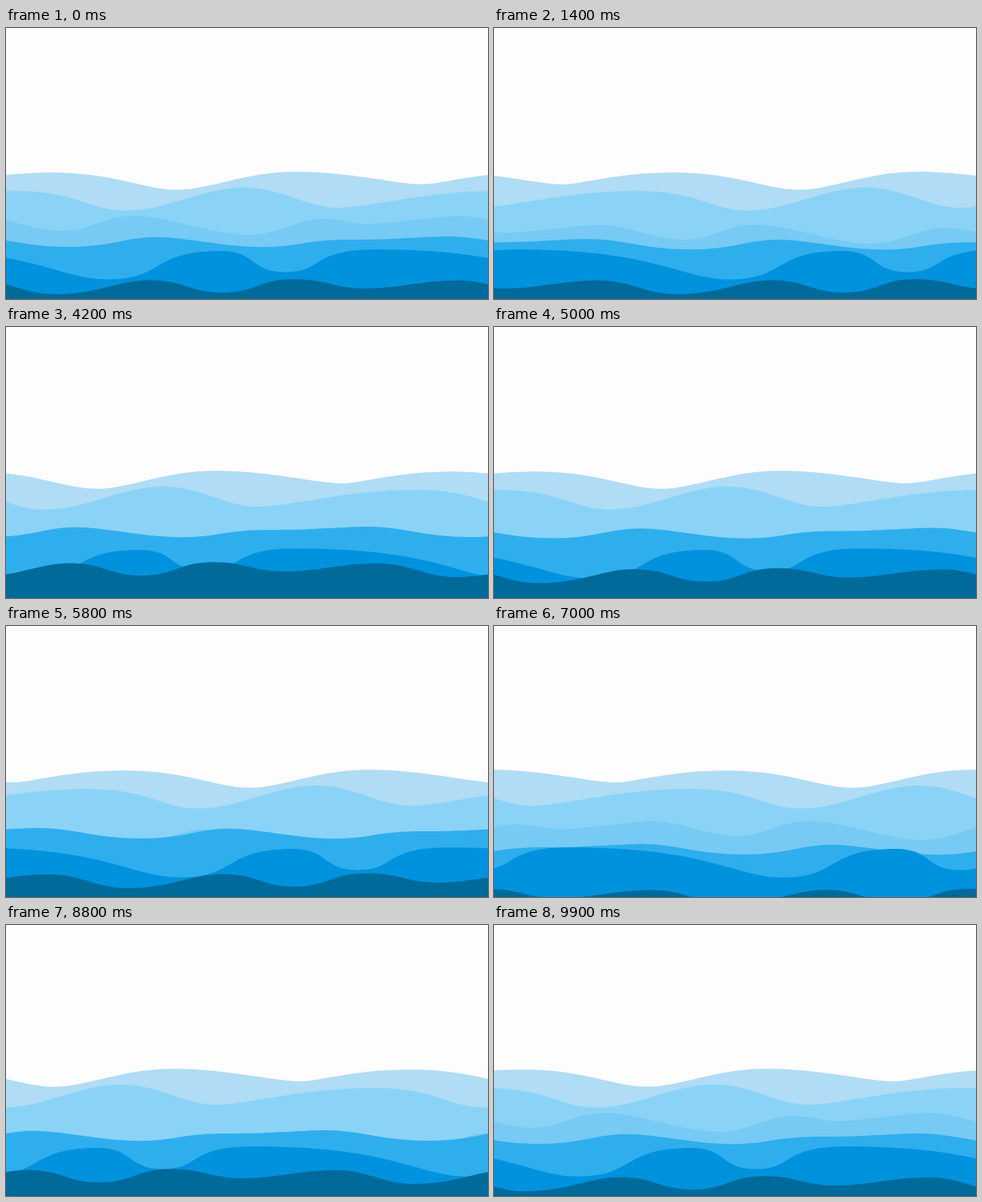
Recreate the animation shown at these times as an HTML page with a canvas. Size 600x338 px, loop 10000 ms.

```html
<!DOCTYPE html>
<html lang="en">
<head>
<meta charset="utf-8">
<title>Waves</title>
<style>
  html, body { margin: 0; width: 100%; height: 100%; overflow: hidden; background: #fefdfe; }
  canvas { display: block; width: 100%; height: 100%; }
</style>
</head>
<body>
<canvas id="sea" width="600" height="338"></canvas>
<script>
const W = 600, H = 338;
const LOOP = 10000, STEP = 100;
const DRIFT = 0.119; // px per ms, shared by all layers
const BOB_TIMES = [0, 2, 2.8, 4.2, 5.8, 7, 8.8, 9.9];
const ctx = document.getElementById('sea').getContext('2d');

// Crests and troughs as [x, y, reach before, reach after]; reach is the
// length of the level Bezier handle, so wide handles make broad crests.
// The wave repeats every W px and the shape spans enough repeats to scroll.
function wave(turns) {
  const path = new Path2D();
  path.moveTo(-2 * W, 2 * H);
  let last = null;
  for (let base = -2 * W; base <= 2 * W; base += W) {
    for (const [x0, y, before, after = before] of turns) {
      const x = base + x0;
      if (last) path.bezierCurveTo(last.x + last.after, last.y, x - before, y, x, y);
      else path.lineTo(x, y);
      last = { x, y, after };
    }
  }
  path.lineTo(last.x, 2 * H);
  path.closePath();
  return path;
}

// Eased rise and fall between the heights at the shared times.
function bobAt(heights, sec) {
  if (!heights) return 0;
  const i = BOB_TIMES.findLastIndex(t => t <= sec);
  if (i === BOB_TIMES.length - 1) return heights[i];
  const u = (sec - BOB_TIMES[i]) / (BOB_TIMES[i + 1] - BOB_TIMES[i]);
  return heights[i] + (heights[i + 1] - heights[i]) * u * u * (3 - 2 * u);
}

const layers = [
  {
    color: '#b0dcf5',
    shape: wave([[58, 180.2, 75], [213, 201.8, 40], [362, 179.2, 65], [517, 195, 28]])
  },
  {
    color: '#8ad3f7',
    shape: wave([[8, 203.3, 85], [150, 227.6, 50], [295, 199, 50], [413, 224.2, 40]])
  },
  {
    color: '#76caf3',
    shape: wave([
      [70, 253, 35], [160, 234.3, 38], [300, 258, 40],
      [393, 238.5, 32], [447, 244.4, 20, 36], [566, 234.5, 30]
    ]),
    bob: [0, 14, 18, 21, 19.5, 9, 25, 0]
  },
  {
    color: '#2faeee',
    shape: wave([
      [78, 273, 55], [187, 260.8, 38], [318, 273.2, 48], [430, 264, 62], [553, 260, 38]
    ]),
    bob: [0, 4, 8, -11, -8, 12, -4, 0]
  },
  {
    color: '#0092dd',
    shape: wave([
      [126, 313.6, 60, 72], [268, 278, 88, 42], [347, 304.4, 42, 50], [462, 276.3, 85, 175]
    ])
  },
  {
    color: '#006a9a',
    shape: wave([
      [60, 332, 38, 55], [180, 314.4, 40], [270, 330, 40],
      [358, 313.3, 42], [447, 325, 40], [562, 314.8, 42]
    ]),
    bob: [0, 0, 13.5, -20, -5, 14.5, -9, 0]
  }
];

function draw(ms) {
  ctx.fillStyle = '#fefdfe';
  ctx.fillRect(0, 0, W, H);
  for (const { color, shape, bob } of layers) {
    ctx.save();
    ctx.translate((ms * DRIFT) % W, bobAt(bob, ms / 1000));
    ctx.fillStyle = color;
    ctx.fill(shape);
    ctx.restore();
  }
}

const start = performance.now();

function tick() {
  const ms = (performance.now() - start) % LOOP;
  draw(Math.floor(ms / STEP) * STEP);
  requestAnimationFrame(tick);
}

tick();
</script>
</body>
</html>
```
